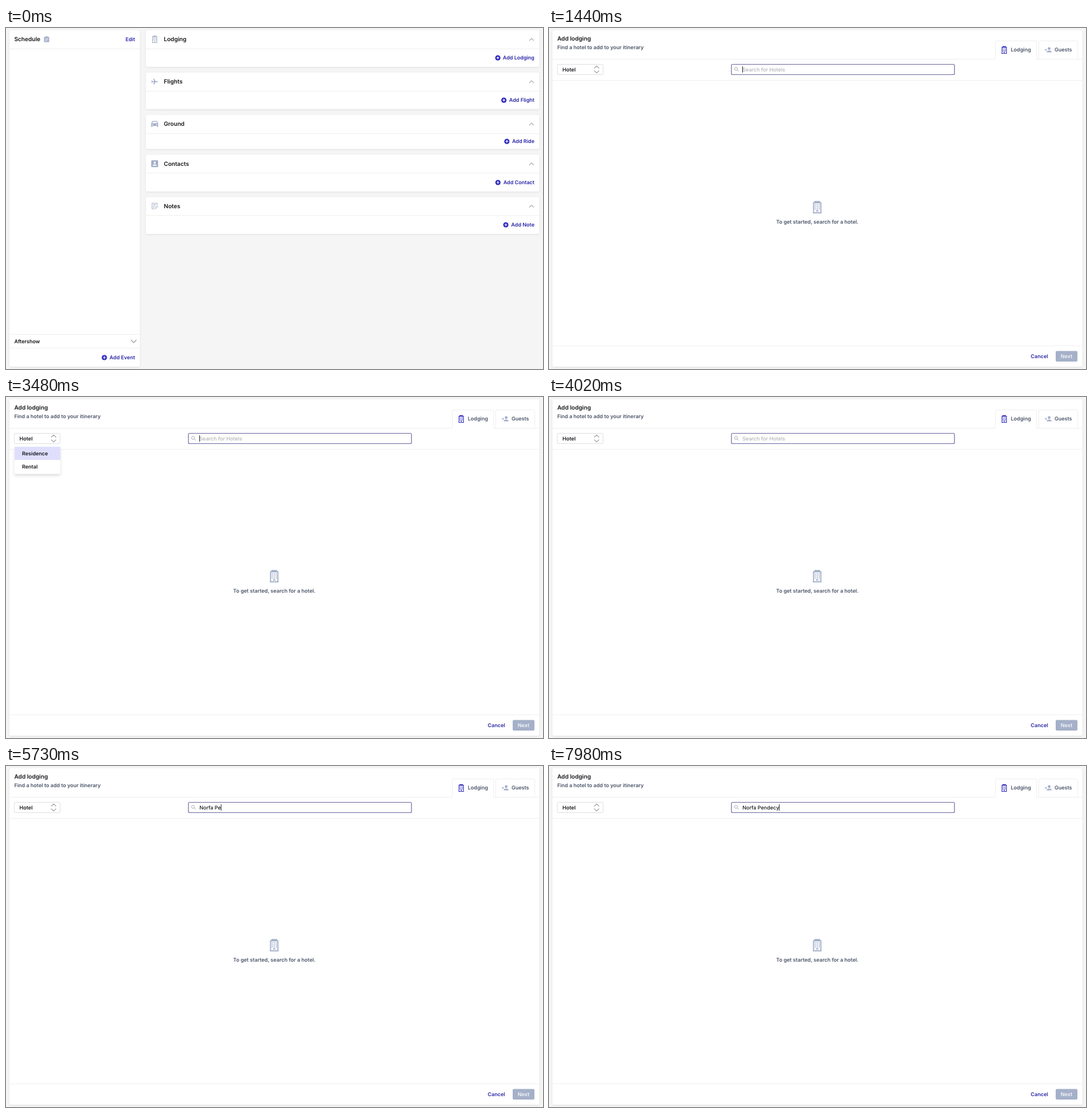
Animation, 939 px wide and 596 px high, one loop 8 s. Source, as an HTML page:

```html
<!DOCTYPE html>
<html lang="en">
<head>
<meta charset="utf-8">
<title>Add lodging</title>
<style>
  html, body { margin: 0; width: 100%; height: 100%; overflow: hidden; background: #f5f5f5; }
  svg { display: block; width: 939px; height: 596px; }
  text { font: 600 9px Inter, sans-serif; fill: #17181c; white-space: pre; text-rendering: geometricPrecision; }
  .title { font-size: 10.1px; }
  .end { text-anchor: end; }
  .mid { text-anchor: middle; }
  .link { fill: #2b27a8; }
  .muted { fill: #4a5468; }
  .input { font-weight: 500; }
  .hint { fill: #b3b3b6; }
  .card { fill: #fff; filter: drop-shadow(0 1px 1.5px rgba(0, 0, 0, .09)); }
  .rule { fill: none; stroke: #efeff0; }
  .icon { color: #a3aec8; }
  .indigo { color: #2f2bbd; }
  .chevron { fill: none; stroke: #a2a4aa; stroke-width: 1.2; stroke-linecap: round; stroke-linejoin: round; }
  .menu { fill: #fff; filter: drop-shadow(0 3px 2.5px rgba(0, 0, 0, .13)); }
  .pick { fill: #dfdffd; }
</style>
</head>
<body>
<svg viewBox="0 0 939 596">
  <defs>
    <symbol id="building" viewBox="0 0 16 22">
      <path fill="none" stroke="currentColor" stroke-width="1.9" d="M1.6 21V3.2H14.4V21"/>
      <path fill="currentColor" d="M3 0H13V3H3ZM.5 20H6.2V16H9.8V20H15.5V22H.5Z"/>
      <path stroke="currentColor" stroke-width="1.9" stroke-dasharray="1.9 1.5" d="M3.7 7H12.4M3.7 10.4H12.4M3.7 13.8H12.4"/>
      <path fill="#fff" d="M7.2 17.6H8.8V20.4H7.2Z"/>
    </symbol>
    <symbol id="plane" viewBox="0 0 12 12">
      <path fill="currentColor" d="M11 5.2Q12.6 6 11 6.8H7.5L4.8 11.2H3.6L5 6.8H2.2L1.2 8.2H.2L.9 6 .2 3.8H1.2L2.2 5.2H5L3.6 .8H4.8L7.5 5.2Z"/>
    </symbol>
    <symbol id="car" viewBox="0 0 12 11">
      <path fill="currentColor" fill-rule="evenodd" d="M2.4 .3H9.6L10.5 1 12 5V10.2Q11.8 11 11 10.8L10.2 10V9H1.8V10L1 10.8Q.2 11 0 10.2V5L1.5 1ZM2.7 1.5 1.7 4.4H10.3L9.3 1.5ZM1.6 6V7.5H3.4V6ZM8.6 6V7.5H10.4V6Z"/>
    </symbol>
    <symbol id="contact" viewBox="0 0 12 12">
      <rect width="12" height="12" rx="1.3" fill="currentColor"/>
      <circle cx="6" cy="4.3" r="1.9" fill="#fff"/>
      <path fill="#fff" d="M2.2 9.6Q2.4 7.2 6 7.2T9.8 9.6Z"/>
    </symbol>
    <symbol id="note" viewBox="0 0 12 12">
      <path fill="none" stroke="currentColor" d="M10.4 4V1H1.3V11H5.2M3 3.5H8.6M3 6H7M3 8.3H5M6.6 10.7V9.2L10.2 5.6 11.4 6.8 7.9 10.5Z"/>
    </symbol>
    <symbol id="plus" viewBox="-5 -5 10 10">
      <circle r="4.6" fill="#2f2bbd"/>
      <path stroke="#fff" stroke-width="1.2" d="M-2.4 0H2.4M0 -2.4V2.4"/>
    </symbol>
  </defs>
  <rect width="939" height="596" fill="#f5f5f5"/>

  <g id="overview">
    <rect class="card" x="6" y="4" width="228" height="588" rx="3"/>
    <path class="rule" d="M6 36.5H234M6 535.5H234M6 559.5H234"/>
    <text class="title" x="14.4" y="23.2">Schedule</text>
    <g fill="#a3aec8">
      <rect x="66.5" y="15.5" width="9" height="9.2" rx="1"/>
      <circle cx="71" cy="15.6" r="1.5"/>
    </g>
    <path stroke="#fff" stroke-width=".8" d="M68.5 18.5H73.5M68.5 20.4H73.5M68.5 22.3H72"/>
    <text class="link end" x="225.6" y="22.7">Edit</text>
    <text x="14.4" y="550.7">Aftershow</text>
    <path class="chevron" style="stroke-width:1.5" d="M219 545.5 223.3 550 227.6 545.5"/>
    <use href="#plus" x="167" y="571" width="10" height="10"/>
    <text class="link end" x="225.6" y="579.1">Add Event</text>
    <rect id="hover" x="851" y="43" width="78" height="18.5" rx="2" fill="#e9e9eb"/>
  </g>

  <g id="dialog">
    <rect class="card" x="6" y="4" width="926.5" height="588" rx="3"/>
    <path class="rule" d="M6 54.5H780M852 54.5H932M6 91.5H932M6 555.5H932
      M780.5 54V25Q780.5 22.5 783 22.5H850Q852.5 22.5 852.5 25V54
      M856.5 54V25Q856.5 22.5 859 22.5H922Q924.5 22.5 924.5 25V54"/>
    <text class="title" x="14.4" y="22.2">Add lodging</text>
    <text class="muted" x="14.4" y="37.4">Find a hotel to add to your itinerary</text>
    <use class="indigo" href="#building" x="791" y="31.7" width="10" height="13.4"/>
    <text class="muted" x="807.5" y="41.4">Lodging</text>
    <g fill="#a3aec8">
      <circle cx="874.6" cy="36" r="2.4"/>
      <path d="M870.2 42.5Q870.2 39.5 874.6 39.5T879 42.5Z"/>
      <path stroke="#a3aec8" stroke-width="1.1" d="M867 38.3H871M869 36.3V40.3"/>
    </g>
    <text class="muted" x="884" y="41.4">Guests</text>

    <rect x="14.5" y="63.5" width="80" height="18" rx="2" fill="#fff" stroke="#dedee1"/>
    <text x="23.6" y="75.5">Hotel</text>
    <path class="chevron" d="M79.3 70.2 83.3 66.3 87.3 70.2M79.3 74.8 83.3 78.7 87.3 74.8"/>

    <rect x="319" y="63.5" width="390" height="18" rx="2" fill="#fff" stroke="#67669e" stroke-width="1.2"/>
    <path fill="none" stroke="#a6a8b0" d="M329 73.4 331.8 76"/>
    <circle cx="327" cy="71.4" r="2.6" fill="none" stroke="#a6a8b0"/>
    <text id="hint" class="input hint" x="338.2" y="75.5">Search for Hotels</text>
    <text id="query" class="input" x="338.2" y="75.5"></text>
    <rect id="caret" y="67" width="1" height="11" fill="#222"/>

    <use class="icon" href="#building" x="461" y="302.3" width="16" height="22"/>
    <text class="muted mid" x="469.2" y="342.2">To get started, search for a hotel.</text>
    <text class="link end" x="872.6" y="576.9">Cancel</text>
    <rect x="886" y="564.5" width="38" height="18.5" rx="2" fill="#a5b0c9"/>
    <text class="mid" style="fill:#f3f5f9" x="905" y="576.9">Next</text>

    <g id="menu">
      <rect class="menu" x="14.5" y="87" width="80.5" height="47.5" rx="2"/>
      <rect id="pickResidence" class="pick" x="15" y="87" width="80" height="23"/>
      <rect id="pickRental" class="pick" x="15" y="110" width="80" height="23"/>
      <text x="28" y="101.9">Residence</text>
      <text x="28" y="124.9">Rental</text>
    </g>
  </g>
</svg>
<script>
  const $ = id => document.getElementById(id);

  // name, icon, top, bottom, action, action centre y, plus centre x
  const sections = [
    ['Lodging', 'building', 4, 68, 'Add Lodging', 52, 860],
    ['Flights', 'plane', 78, 142, 'Add Flight', 126, 870.6],
    ['Ground', 'car', 152, 211.5, 'Add Ride', 198, 875.8],
    ['Contacts', 'contact', 221.5, 285.7, 'Add Contact', 269.8, 860.2],
    ['Notes', 'note', 295.5, 360, 'Add Note', 343.8, 874]
  ];
  const cardMarkup = ([name, icon, top, bottom, action, y, plusX]) => {
    const line = Math.floor(top + 32) + .5, mid = top + 15.7;
    return `<rect class="card" x="244.5" y="${top}" width="688" height="${bottom - top}" rx="3"/>
      <path class="rule" d="M244.5 ${line}H932.5"/>
      <use class="icon" href="#${icon}" x="254" y="${mid - 6.5}" width="12" height="13"/>
      <text class="title" x="276" y="${mid + 3.6}">${name}</text>
      <path class="chevron" d="M915.5 ${mid + 2}l3.5-3.6 3.5 3.6"/>
      ${name === 'Lodging' ? '<g id="hoverSlot"></g>' : ''}
      <use href="#plus" x="${plusX - 5}" y="${y - 4.8}" width="10" height="10"/>
      <text class="link end" x="924" y="${y + 3.3}">${action}</text>`;
  };
  $('overview').insertAdjacentHTML('beforeend', sections.map(cardMarkup).join(''));
  $('hoverSlot').append($('hover'));

  const LOOP = 8000, OPEN = 1440;
  const phrase = 'Norfa Pendecy';
  const keyTimes = [4950, 5160, 5250, 5340, 5400, 5490, 5580, 5730, 5820, 5910, 6000, 6090, 6180];
  const shown = {
    overview: [[0, OPEN]],
    hover: [[1320, OPEN]],
    dialog: [[OPEN, LOOP]],
    menu: [[2670, 4020]],
    pickResidence: [[3060, 3090], [3480, 3630]],
    pickRental: [[3090, 3480]],
    hint: [[OPEN, keyTimes[0]]],
    caret: [[OPEN, 1920], [2370, 2820], [3270, 3690], [4140, 4620], [4650, 6630], [7080, 7530], [7980, LOOP]]
  };

  function render() {
    const t = performance.now() % LOOP;
    for (const id in shown) {
      const on = shown[id].some(([from, to]) => t >= from && t < to);
      $(id).style.display = on ? '' : 'none';
    }
    const query = $('query');
    query.textContent = phrase.slice(0, keyTimes.filter(k => k <= t).length);
    const width = query.textContent ? query.getComputedTextLength() : 0;
    $('caret').setAttribute('x', 338 + width);
    requestAnimationFrame(render);
  }
  render();
</script>
</body>
</html>
```
